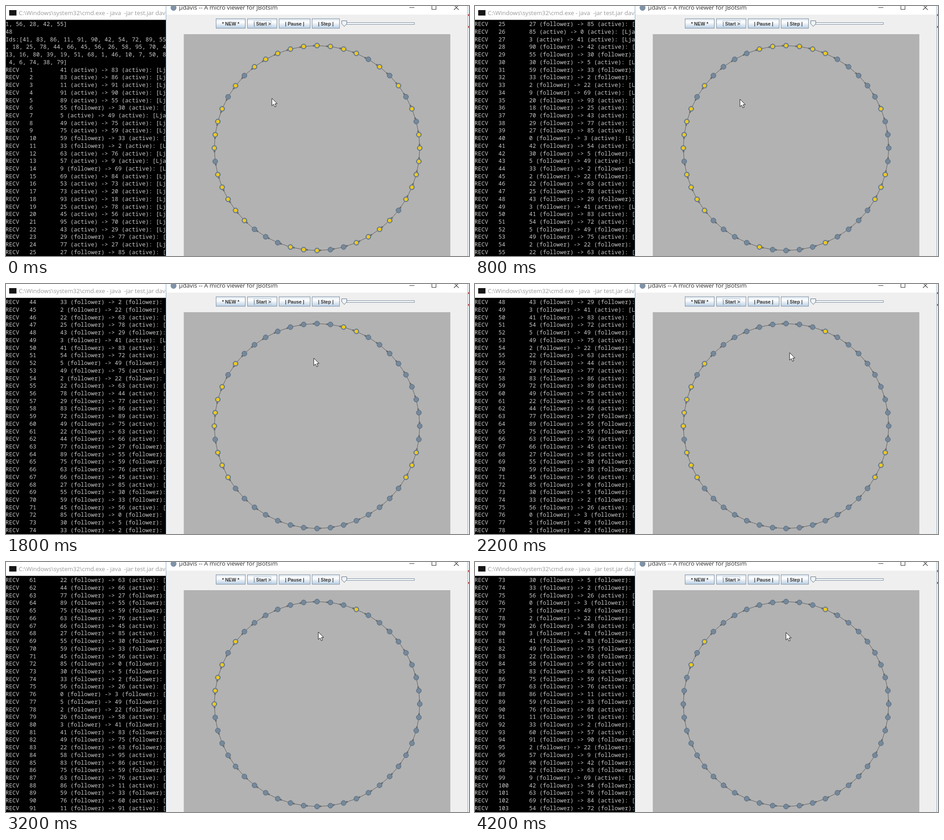
An HTML page that plays this animation: 1017 by 550 pixels, repeating every 4400 ms.

```html
<!DOCTYPE html>
<html lang="en">
<head>
<meta charset="utf-8">
<title>Ring election</title>
<style>
  html, body { margin: 0; width: 100%; height: 100%; overflow: hidden; background: #fff; }
  svg { display: block; }
  svg text { white-space: pre; }
  .console { font: 12.5px "Noto Sans Mono", "DejaVu Sans Mono", monospace; fill: #cacaca; }
  .title { font: 13px "Open Sans", "Noto Sans", sans-serif; }
  .button { font: bold 10.4px "Liberation Sans", Arial, sans-serif; fill: #333; text-anchor: middle; }
</style>
</head>
<body>
<svg id="stage" width="1017" height="550" viewBox="0 0 1017 550">
  <defs>
    <linearGradient id="metal" x1="0" y1="0" x2="0" y2="1">
      <stop offset="0" stop-color="#dde8f3"/>
      <stop offset=".35" stop-color="#fff"/>
      <stop offset="1" stop-color="#b8cfe5"/>
    </linearGradient>
  </defs>

  <rect width="352" height="550" fill="#000"/>
  <rect width="352" height="30.5" fill="#fff"/>
  <rect x="7" y="9" width="16" height="12" fill="#151515"/>
  <text class="title" x="28" y="20" fill="#999">C:\Windows\system32\cmd.exe - java  -jar test.jar dav</text>
  <g id="console" class="console"></g>

  <rect x="351" width="666" height="550" fill="#efefef"/>
  <rect x="351" width="666" height="19" fill="#fff"/>
  <rect x="351" width="1" height="550" fill="#7fa6c2"/>
  <rect x="1015" width="2" height="550" fill="#fff"/>
  <rect x="1014" width="1" height="550" fill="#7f9db5"/>
  <path d="M1016 18v4M1016 44v4" stroke="#c65a50" stroke-width="2"/>
  <circle cx="368" cy="4" r="6.5" fill="#7f93a8"/>
  <text class="title" x="380" y="8" fill="#333" style="font-size:13.2px">µdavis -- A micro viewer for JBotsim</text>
  <path d="M886 3.5h11M935.5 -2v9.5h9V-2M984 -2l10.5 10.5M994.5 -2L984 8.5" fill="none" stroke="#333" stroke-width="1.1"/>
  <g id="buttons"></g>
  <rect x="544.5" y="32.5" width="37.5" height="13" fill="none" stroke="#b4c6d8"/>
  <rect x="745.5" y="36.5" width="151.5" height="4" fill="#f5f8fb" stroke="#7a8a99"/>
  <path d="M737.5 32.5h11v6.5l-5.5 6l-5.5-6z" fill="#eef4fa" stroke="#5f7080"/>
  <rect x="390.5" y="62" width="585.5" height="488" fill="#b2b2b2"/>
  <g id="ring"></g>
  <path id="pointer" d="M0 0V16.5L3.8 13L6.5 19L9.3 17.8L6.7 12H11.8Z" fill="#fff" stroke="#111"/>
</svg>
<script>
const LOOP = 4400, VISIBLE_ROWS = 31, UNFLUSHED = 2;

const ring = ("41 83 86 11 91 90 42 54 72 89 55 30 5 49 75 59 33 2 22 63 76 60 57 9 " +
  "69 84 53 73 20 93 18 25 78 44 66 45 56 26 58 95 70 43 29 77 27 85 0 3").split(" ");

// Each round: start time and senders; "*" turns the next node into a follower.
const rounds = [
  [0, "41 83 11 91* 89* 55* 5 49 75* 59* 33* 63 57* 9 69 53 73* 93* 25 45 95* 43* 29 77* 27 85* 3"],
  [200, "90* 55 30* 59 33 2* 9 20 18* 70* 29 27 0*"],
  [400, "42* 30 5* 33 2 22 25* 43 3*"],
  [600, "41* 54* 5 49 2 22 78* 29*"],
  [1000, "83 72* 49* 22* 44* 77"],
  [1400, "89 75 63 66* 27*"],
  [1800, "55 59 45* 85"],
  [1800, "30 33 56* 0"],
  [2000, "5 2 26* 3"],
  [2400, "41 49 22 58"],
  [2800, "83* 75 63*"],
  [2800, "86* 59 76*"],
  [3000, "11* 33 60*"],
  [3400, "91 2 57"],
  [3800, "90 22 9*"],
  [3800, "42 63 69*"],
  [4000, "54 76 84*"]
];

const pointerPath = [
  [0, 584, 203], [400, 583, 204], [800, 582, 205], [1200, 581, 206], [1800, 676, 163],
  [2000, 700, 147], [2200, 691, 151], [2400, 687, 153], [2600, 686, 154], [4200, 683, 155]
];

const byId = id => document.getElementById(id);

function add(parent, tag, attrs, text = "") {
  const el = document.createElementNS("http://www.w3.org/2000/svg", tag);
  for (const name in attrs) el.setAttribute(name, attrs[name]);
  el.textContent = text;
  parent.appendChild(el);
  return el;
}

// Replay the messages once to get the log and the moment each node gives up.
const lines = [
  "1, 56, 28, 42, 55]",
  "48",
  "Ids:[" + ring.slice(0, 11).join(", "),
  ", " + ring.slice(30, 42).join(", "),
  "13, 16, 80, 39, 19, 51, 68, 1, 46, 10, 7, 50, 8",
  " 4, 6, 74, 38, 79]"
];
const followerSince = ring.map(() => Infinity);
const snapshots = [];
let received = 0;
for (const [start, senders] of rounds) {
  for (const token of senders.split(" ")) {
    const from = ring.indexOf(token.replace("*", ""));
    const to = (from + 1) % ring.length;
    const label = i => `${ring[i]} (${followerSince[i] < Infinity ? "follower" : "active"})`;
    received++;
    lines.push(`RECV   ${String(received).padEnd(9)}${label(from)} -> ${label(to)}: [Ljava`);
    if (token.endsWith("*")) followerSince[to] = start;
  }
  snapshots.push([start, lines.length - UNFLUSHED]);
}

const rows = Array.from({ length: VISIBLE_ROWS }, (_, i) =>
  add(byId("console"), "text", { x: -1, y: 44.3 + i * 16.72 }));

for (const [x, width, label] of [
  [461.5, 64, "* NEW *"], [530.5, 64.5, "| Start >"], [600, 68, "| Pause |"], [672.5, 60, "| Step |"]
]) {
  add(byId("buttons"), "rect", { x, y: 28, width, height: 21, fill: "url(#metal)", stroke: "#7a8a99" });
  add(byId("buttons"), "text", { class: "button", x: x + width / 2, y: 42.5 }, label);
}

const places = ring.map((_, i) => {
  const angle = i * 2 * Math.PI / ring.length;
  return [683.2 + 225.6 * Math.cos(angle), 312.5 + 225.4 * Math.sin(angle)];
});
add(byId("ring"), "polygon", { points: places.join(" "), fill: "none", stroke: "#444", "stroke-width": 0.8 });
const dots = places.map(([x, y], i) => {
  const [px, py] = places[(i + ring.length - 1) % ring.length];
  const reach = 7.5 / Math.hypot(px - x, py - y);
  add(byId("ring"), "circle", {
    cx: x + (px - x) * reach, cy: y + (py - y) * reach, r: 1.5, fill: "#888", stroke: "#444", "stroke-width": 0.8
  });
  add(byId("ring"), "circle", { cx: x, cy: y, r: 5.5, fill: "#778899", stroke: "#4c667f", "stroke-width": 1 });
  return add(byId("ring"), "circle", { cx: x, cy: y, r: 3.7, fill: "#efc91c" });
});

const latest = (steps, t) => steps.filter(step => step[0] <= t).pop();

function draw(t) {
  const end = latest(snapshots, t)[1];
  rows.forEach((row, i) => {
    const line = lines[end - VISIBLE_ROWS + i];
    if (row.textContent !== line) row.textContent = line;
  });
  // The first round is already over when the loop begins.
  dots.forEach((dot, i) => dot.setAttribute("visibility", t < followerSince[i] ? "visible" : "hidden"));
  const [, x, y] = latest(pointerPath, t);
  byId("pointer").setAttribute("transform", `translate(${x} ${y})`);
}

const origin = performance.now();
function tick() {
  draw(Math.max(0, performance.now() - origin) % LOOP);
  requestAnimationFrame(tick);
}
tick();
</script>
</body>
</html>
```
